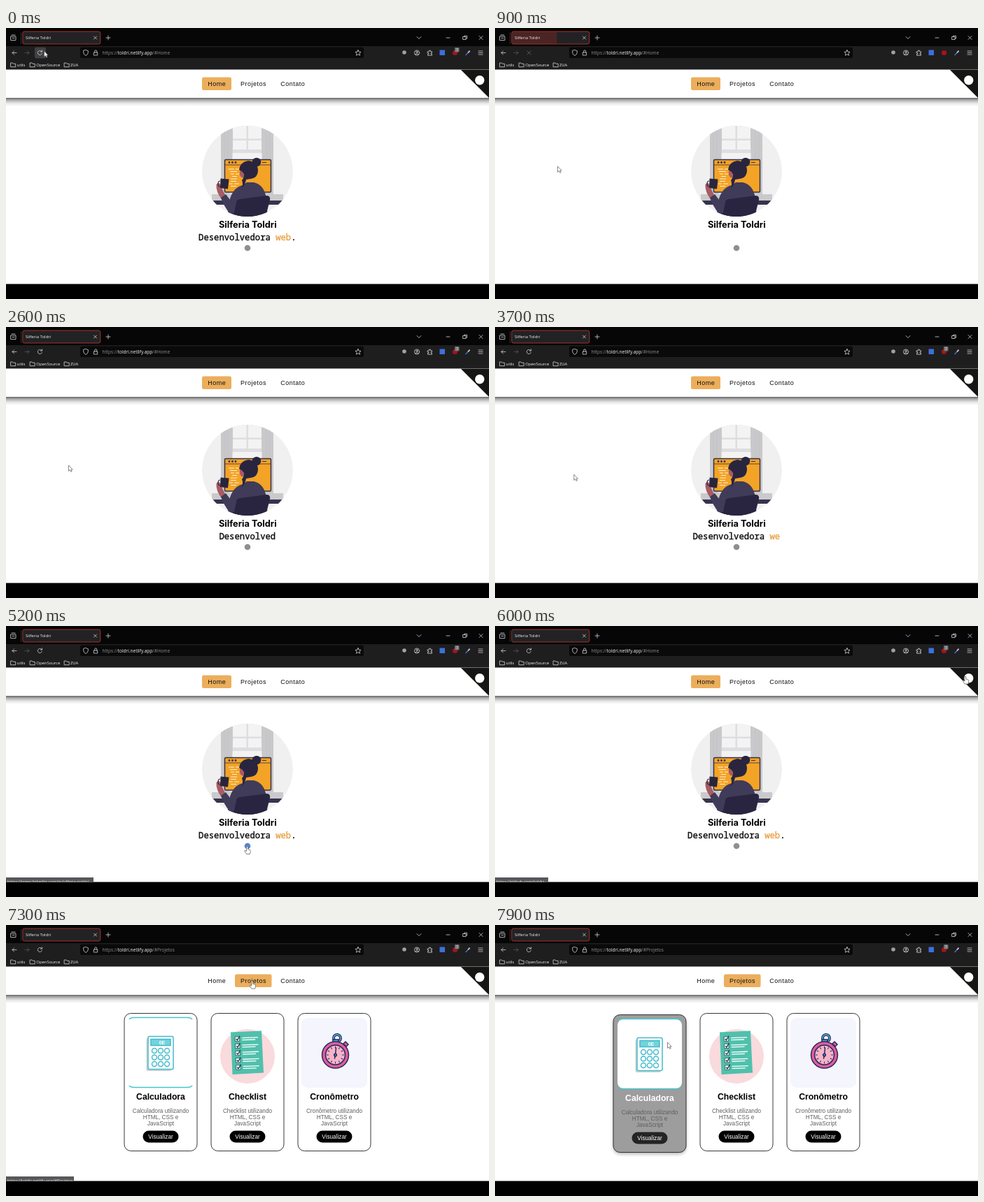
Recreate the animation shown at these times as an HTML page. Size 690 px wide and 388 px high, loop 8 s.

```html
<!DOCTYPE html>
<html lang="pt-BR">
<head>
<meta charset="utf-8">
<title>Portfolio</title>
<style>
html, body { margin: 0; width: 100%; height: 100%; overflow: hidden; background: #000; }
svg { display: block; width: 690px; height: 388px; }
.ui { font-family: "Open Sans", "Noto Sans", sans-serif; font-size: 5.9px; fill: #f4f4f4; }
.page { font-family: "Liberation Sans", Arial, sans-serif; }
.nav { font-size: 9px; letter-spacing: .5px; fill: #111; }
.mid { text-anchor: middle; }
.line { fill: none; stroke: #d4d4d8; stroke-width: .8; stroke-linecap: round; stroke-linejoin: round; }
.role { font: 12.24px "Noto Sans Mono", "DejaVu Sans Mono", monospace; fill: #111; stroke: #111; stroke-width: .4; }
.role #web { fill: #e9a44b; stroke: #e9a44b; }
</style>
</head>
<body>
<svg viewBox="0 0 690 388">
  <defs>
    <linearGradient id="shade" x2="0" y2="1">
      <stop stop-color="#000" stop-opacity=".6"/>
      <stop offset=".3" stop-color="#000" stop-opacity=".3"/>
      <stop offset=".65" stop-color="#000" stop-opacity=".09"/>
      <stop offset="1" stop-color="#000" stop-opacity="0"/>
    </linearGradient>
    <clipPath id="disc"><circle cx="345" cy="205" r="65"/></clipPath>
    <clipPath id="view"><rect y="59.600" width="690" height="306.900"/></clipPath>
    <filter id="blur"><feGaussianBlur stdDeviation="2.5"/></filter>
  </defs>
  <rect width="690" height="388"/>

  <!-- Browser -->
  <g class="ui">
    <rect width="690" height="26" fill="#060607"/>
    <rect y="26" width="690" height="34" fill="#1e1e1f"/>
    <path d="M21.500 6V23" stroke="#2c2c2e"/>
    <rect x="24" y="5" width="111" height="18" rx="2.500" fill="#222224"/>
    <rect id="progress" x="24.500" y="5.500" height="17" rx="2" fill="#4b2423"/>
    <rect x="23.800" y="5" width="111" height="18" rx="2.500" fill="none" stroke="#b8352a" stroke-width=".9"/>
    <text x="28" y="16.200" font-size="6">Silferia Toldri</text>
    <path class="line" d="M125.500 12l4 4m0-4l-4 4M143 14h6m-3-3v6M587 12.500l3 3 3-3M629 14h5M653 12.500h4v4h-4zM654.500 12.500v-1.300h4v4h-1.300M676 11.500l5 5m0-5l-5 5M7 12h7v5.500h-7zM8 10h5M9 14.500h3"/>
    <g transform="translate(0 .5)">
      <rect x="106" y="27" width="405" height="15.500" rx="2.500" fill="#0a0a0b"/>
      <rect id="reloadBg" x="41" y="27" width="16" height="16" rx="2.500" fill="#414144"/>
      <g class="line">
        <path d="M15 35H9m2.600-2.600L9 35l2.600 2.600"/>
        <path d="M27 35h6m-2.600-2.600L33 35l-2.600 2.600" opacity=".3"/>
        <path id="reload" d="M51 33.200a3.100 3.100 0 1 0 .4 2.800M51.600 31.300v2.300h-2.300"/>
        <path id="stop" d="M46 32.500l5 5m0-5l-5 5" opacity=".4"/>
        <path d="M114 31l3.300 1.200v2.300q0 3-3.300 4.500-3.300-1.500-3.300-4.500v-2.300z"/>
        <path d="M125.700 34.500h5v4h-5zM126.700 34.500v-1.700a1.500 1.500 0 0 1 3 0v1.700"/>
        <path d="M503 31l1.200 2.600 2.900.3-2.200 1.900.7 2.900-2.600-1.500-2.600 1.500.7-2.900-2.200-1.900 2.900-.3z"/>
        <circle cx="587" cy="35" r="3.600"/><circle cx="587" cy="34" r="1.200"/><path d="M584.800 37.200q2.200-2 4.400 0"/>
        <path d="M602.500 33.300h2v-1.600h2v1.600h2v2h-1.300v1.600h1.300v1.800h-6v-1.800h1.300v-1.600h-1.300z"/>
        <path d="M675 32.500h6m-6 2.500h6m-6 2.500h6"/>
        <path d="M7 49.500h2.500l1 1.200h3.200v4.500H7zM34.500 49.500h2.500l1 1.200h3.200v4.500h-6.700zM83.500 49.500h2.500l1 1.200h3.200v4.500h-6.700z"/>
      </g>
      <circle cx="569" cy="34.500" r="2.800" fill="#a2a2a6"/>
      <rect x="619.500" y="31" width="7.500" height="7.500" fill="#3f6fdb"/>
      <circle cx="641.500" cy="35" r="3.600" fill="#a3131f"/>
      <path d="M656.500 38.500l4-4" stroke="#4a78dd" stroke-width="1.300"/>
      <path d="M660 35l2.500-2.800" stroke="#d9c4dc" stroke-width="1.800"/>
      <g id="badge"><rect x="641" y="27.500" width="6.500" height="6.500" rx="1" fill="#707074"/><text class="mid" x="644.300" y="32.800" font-size="5.500">3</text></g>
      <text x="137.500" y="37.400" font-size="6.500" fill="#8e8e93">https://<tspan fill="#f4f4f4">toldri.netlify.app</tspan>/#<tspan id="hash"></tspan></text>
      <text x="15.800" y="54.200">utils</text><text x="43.300" y="54.200">OpenSource</text><text x="92" y="54.200">ZUA</text>
    </g>
  </g>

  <!-- Page -->
  <g class="page" clip-path="url(#view)">
    <rect y="59" width="690" height="308" fill="#fff"/>
    <rect y="100" width="690" height="12" fill="url(#shade)"/>
    <g id="nav" class="nav mid"></g>
    <path d="M649.500 59.600H690V100.100z" fill="#151513"/>
    <circle cx="676.700" cy="74.800" r="6.700" fill="#fff"/>

    <g id="home">
      <g clip-path="url(#disc)">
        <circle cx="345" cy="205" r="65" fill="#f0f0f1"/>
        <path d="M319 140h52v100h-52z" fill="#dedee0"/>
        <path d="M323 140h20.500v18.500h-20.500zM346 140h20v18.500h-20zM323 161h20.500v13h-20.500zM346 161h20v13h-20zM323 179h44v61h-44z" fill="#f3f3f4"/>
        <path d="M307 140h17q1 52-5 99h-12zM382 140h-17q-1 52 5 99h12z" fill="#c9c9cb"/>
        <path d="M312 142v96M317 142l-1 96M377 142v96M372 142l1 96" stroke="#c0c0c3" stroke-width=".6"/>
        <path d="M294 238h102v9H294z" fill="#cacacc"/>
        <path d="M280 247h130v6H280z" fill="#37334d"/>
        <rect x="312.500" y="188.500" width="66" height="46.500" rx="1.500" fill="#f3a326" stroke="#34304b" stroke-width="1.500"/>
        <path d="M313 196h66" stroke="#34304b" stroke-width=".8"/>
        <g fill="#34304b"><circle cx="319" cy="192.500" r="1.400"/><circle cx="323.500" cy="192.500" r="1.400"/><circle cx="328" cy="192.500" r="1.400"/></g>
        <path d="M366 192.500h6" stroke="#34304b"/>
        <path d="M318 202h8m2 0h5M320 205.500h10M321 209h5m2 0h5M323 212.500h7M321 216h9M321 219.500h8M319 223h5m2 0h7M321 226.500h8" stroke="#fff0d1" stroke-width="1.200"/>
        <path d="M334.500 202q-2 9 2 12l8 1v-13z" fill="#a85b63"/>
        <path d="M317 271q-1-40 21-46l6-4h10q13 3 17 18l3 32z" fill="#403b59"/>
        <path d="M300.500 224q3-4 6 0l3 8 5 10-6 4q-9-12-8-22z" fill="#a85b63"/>
        <path d="M307 243l7-5 9 12-3 16q-9-11-13-23z" fill="#403b59"/>
        <path d="M306.500 215.500l12 1-1.500 14-11-1.500z" fill="#29253b"/>
        <path d="M306 219q-3 0-3 4t3 4" fill="none" stroke="#29253b" stroke-width="1.200"/>
        <path d="M333 203q1-11 13-13 13 1 14 13 0 12-11 13l-6 1q-1 7-6 13 2-7 0-12 4-5 3-9-2-4-7-6z" fill="#29253f"/>
        <circle cx="358" cy="192" r="6.300" fill="#29253f"/>
        <path d="M329 250q0-4 5-5l38-5q6 0 5 6l-4 16q-1 4-5 4l-39 4q-6-1-3-6z" fill="#292540"/>
        <path d="M323 265q-8 1-9 6h60v-5z" fill="#292540"/>
      </g>
      <text class="mid" x="345.300" y="286" font-size="12.800" font-weight="700" font-family="Inter, sans-serif">Silferia Toldri</text>
      <text class="mid role" x="344.800" y="304.200" xml:space="preserve"><tspan id="role"></tspan><tspan id="web"></tspan><tspan id="dot"></tspan></text>
      <circle id="social" cx="345" cy="315" r="4.300"/>
    </g>
    <g id="projects"></g>

    <g id="status" class="ui">
      <rect id="statusBg" y="360" height="8" fill="#58585c"/>
      <text id="statusText" x="2" y="367.700"></text>
    </g>
  </g>

  <g id="cursor" fill="#fff" stroke="#555" stroke-width=".7" stroke-linejoin="round">
    <path id="arrow" d="M-.5 0V8.300L1.500 6.600 2.800 9.300 4.100 8.700 2.900 6.100H5.200z"/>
    <path id="hand" d="M-1 .8Q0-.7 1 .8V4.200l3 .8q1 .4.8 1.800L4 11H-1L-3.500 7q-.3-1.500 1-1L-1 7z"/>
  </g>
</svg>
<script>
const LOOP = 8000, ORANGE = '#ecae5c';
const $ = id => document.getElementById(id);
const show = (id, on) => $(id).setAttribute('visibility', on ? 'visible' : 'hidden');
const set = (el, attrs) => { for (const k in attrs) el.setAttribute(k, attrs[k]); };
const clamp = v => Math.max(0, Math.min(1, v));

const tabs = [['Home', 280, 42], ['Projetos', 327, 52.500], ['Contato', 384, 51]];
$('nav').innerHTML = tabs.map(([name, x, w]) =>
  `<rect x="${x}" y="70.500" width="${w}" height="18.500" rx="2.500"/>
   <text x="${x + w / 2 + .2}" y="82.700">${name}</text>`).join('');
const tabBoxes = [...$('nav').querySelectorAll('rect')];

const grid = (cols, rows, cell) => Array.from({ length: cols * rows },
  (_, i) => cell(i % cols, Math.floor(i / cols))).join('');

const calculator = `
  <rect x="175" y="132.500" width="92" height="100" rx="9" fill="#fff"/>
  <path d="M176 135q2-2.500 7-2.500h76q5 0 7 2.500M176 230q2 2.500 7 2.500h76q5 0 7-2.500" fill="none" stroke="#45c5cf" stroke-width="1.500"/>
  <rect x="200.500" y="162" width="36" height="47" rx="2" fill="#c9d2d6"/>
  <g fill="#fff" stroke="#43bccb" stroke-width="1.500">
    <rect x="203" y="159.500" width="36" height="47" rx="2"/>
    <rect x="207" y="163.500" width="28" height="9" fill="#73d3dc"/>
    ${grid(3, 3, (c, r) => `<circle cx="${212 + c * 9}" cy="${180 + r * 9.500}" r="3.500"/>`)}
  </g>
  <text x="223" y="171" font-size="7" font-weight="700" fill="#fff">0E</text>`;

const checklist = `
  <circle cx="345" cy="188" r="39" fill="#f9dadd"/>
  <path d="M321 153.500L365 151.500 368 211.500 323.500 214z" fill="#50c0ac"/>
  <g fill="none" stroke="#fff" stroke-width="1.300">
  ${grid(1, 5, (c, r) => `<g transform="translate(${327 + r * .4} ${160 + r * 10.200}) rotate(-2)">
    <rect width="6.500" height="6.500" fill="#e9f6f2" stroke="#28545c" stroke-width=".8"/>
    <path d="M1.500 3l1.700 2 4-6" stroke="#223c48"/><path d="M10 2h23M10 5h19"/></g>`)}
  </g>`;

const stopwatch = `
  <rect x="422" y="133" width="94" height="100" rx="9" fill="#f4f5fd"/>
  <g stroke="#29295c" stroke-width="1.500" stroke-linecap="round">
    <circle cx="473" cy="162" r="5" fill="none" stroke-width="4"/>
    <circle cx="473" cy="162" r="5" fill="none" stroke="#42a9ca" stroke-width="1.800"/>
    <path d="M467 164h8v5h-8z" fill="#42a9ca"/>
    <path d="M485 167l4 4-3 3-4-4z" fill="#e0609d"/>
    <circle cx="470.500" cy="186" r="19" fill="#df5d9c"/>
    <circle cx="470.500" cy="186" r="14" fill="#f5b3c8"/>
    ${grid(12, 1, c => `<path d="M470.500 174v2" transform="rotate(${c * 30} 470.500 186)" stroke-width="1"/>`)}
    <path d="M470.500 186l1-10M470.500 186l-1 5"/><circle cx="470.500" cy="186" r="1.800" fill="#42a9ca"/>
  </g>`;

const card = (x, name, art) => {
  const mid = x + 52;
  const about = [`${name} utilizando`, 'HTML, CSS e', 'JavaScript'];
  return `<g class="card mid">
    <rect class="glow" x="${x}" y="129" width="104" height="197" rx="10" fill="#000" opacity="0" filter="url(#blur)"/>
    <rect class="face" x="${x}" y="126.500" width="104" height="197" rx="9.500" fill="#fff" stroke="#222" stroke-width=".9"/>
    ${art}
    <text class="title" x="${mid}" y="250" font-size="12.200" font-weight="700">${name}</text>
    ${about.map((s, i) => `<text x="${mid}" y="${269 + i * 9.200}" font-size="8.200" fill="#5f5f5f">${s}</text>`).join('')}
    <rect class="button" x="${mid - 25.500}" y="294.500" width="51" height="17" rx="8.500"/>
    <text x="${mid}" y="306" font-size="8.200" fill="#fff">Visualizar</text></g>`;
};
$('projects').innerHTML = card(169, 'Calculadora', calculator) +
  card(293, 'Checklist', checklist) + card(417, 'Cronômetro', stopwatch);
const firstCard = document.querySelector('.card');

// Pointer path: time, x, y
const path = [[0, 55, 33], [250, 55, 33], [850, 90, 198], [3450, 90, 198], [3700, 113, 211],
  [4300, 290, 272], [4600, 344.500, 315.500], [5250, 344.500, 315.500], [6000, 672, 72], [6200, 672, 72],
  [6750, 393, 81], [6850, 393, 81], [7050, 352, 80], [7300, 352, 80], [7850, 247, 168], [LOOP, 247, 168]];
function pointer(t) {
  const i = path.findIndex(k => k[0] > t);
  const [t0, x0, y0] = path[i - 1], [t1, x1, y1] = path[i];
  const p = (t - t0) / (t1 - t0);
  return [x0 + (x1 - x0) * p, y0 + (y1 - y0) * p];
}

// Links: left, top, right, bottom, address, width of the status label
const site = 'https://toldri.netlify.app/#';
const links = [
  ...tabs.map(([name, x, w]) => [x, 70, x + w, 89, site + name, 97]),
  [340, 310, 350, 320, 'https://www.linkedin.com/in/silferia-toldri/', 125],
  [655, 59, 690, 92, 'https://github.com/toldri', 76]
];
const inside = ([l, t, r, b], x, y) => x >= l && x <= r && y >= t && y <= b;

const CLICK = 7250, RELOAD = 300, LOADED = 1100, READY = 1500;
const typed = [1000, 1000, 1000, 1100, 1300, 1500, 1700, 1800, 2100, 2300,
  2500, 2900, 2900, 3100, 3300, 3500, 3700, 3900, 4100];
const phrase = 'Desenvolvedora web.';

function render(t) {
  const [x, y] = pointer(t);
  const onProjects = t >= CLICK;
  const loading = t >= RELOAD && t < LOADED;

  let hit = links.findIndex(l => inside(l, x, y));
  if (onProjects && hit === 3) hit = -1;
  set($('cursor'), { transform: `translate(${x} ${y})` });
  show('arrow', hit < 0);
  show('hand', hit >= 0);
  show('status', hit >= 0);
  if (hit >= 0) {
    $('statusText').textContent = links[hit][4];
    set($('statusBg'), { width: links[hit][5] });
  }

  const active = onProjects ? 1 : 0;
  tabBoxes.forEach((box, i) =>
    set(box, { fill: i === active ? ORANGE : i === hit ? '#efbf80' : 'none' }));
  set($('social'), { fill: hit === 3 ? '#5b82cb' : '#8f8f92' });
  $('hash').textContent = tabs[active][0];

  show('reloadBg', inside([41, 27, 57, 43], x, y));
  show('reload', !loading);
  show('stop', loading);
  set($('reload'), { opacity: t >= LOADED && t < READY ? .4 : 1 });
  show('badge', t < RELOAD || t >= READY);
  set($('progress'), {
    width: t < RELOAD ? 0 : t < 1000 ? 64 * clamp((t - RELOAD) / 550) : 110,
    opacity: t < 1000 ? 1 : clamp((1350 - t) / 350)
  });

  const count = t < RELOAD ? phrase.length : typed.filter(k => k <= t).length;
  $('role').textContent = phrase.slice(0, count > 15 ? 15 : Math.min(count, 14));
  $('web').textContent = phrase.slice(15, Math.max(15, Math.min(count, 18)));
  $('dot').textContent = phrase.slice(18, Math.max(18, count));

  show('home', !onProjects);
  show('projects', onProjects);
  const hover = onProjects && inside([169, 126, 273, 324], x, y) ? clamp((t - 7700) / 150) : 0;
  const grey = (from, to) => { const v = Math.round(from + (to - from) * hover); return `rgb(${v},${v},${v})`; };
  const part = name => firstCard.querySelector(name);
  set(firstCard, { transform: `translate(0 ${2 * hover})` });
  set(part('.glow'), { opacity: .3 * hover });
  set(part('.face'), { fill: grey(255, 157) });
  set(part('.title'), { fill: grey(0, 255) });
  set(part('.button'), { fill: grey(0, 36) });
}

function frame() {
  render(performance.now() % LOOP);
  requestAnimationFrame(frame);
}
frame();
</script>
</body>
</html>
```
